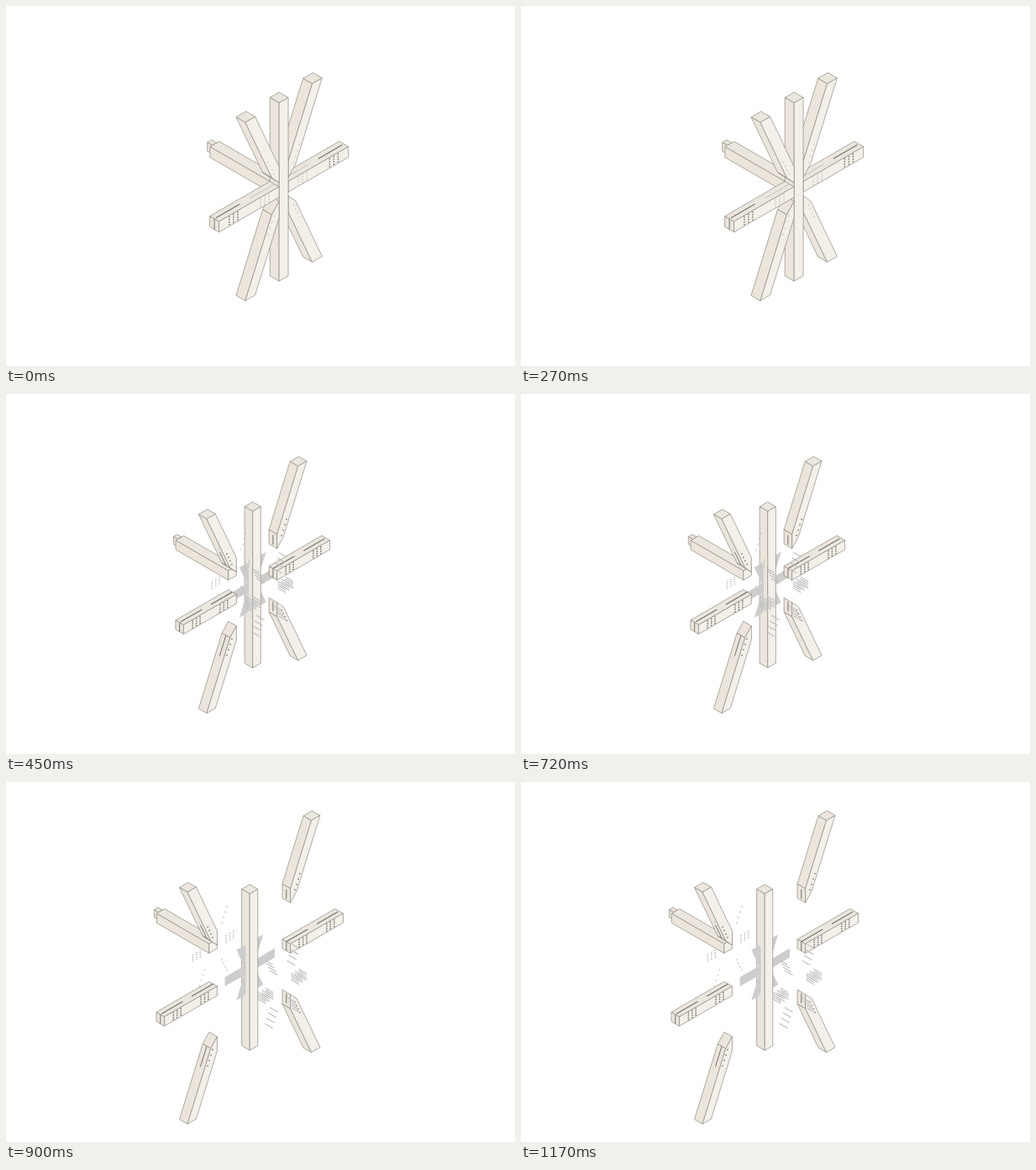
Write an HTML page with a canvas that moves like this. It is 606 px wide and 428 px high and loops after 1.35 s.

```html
<!DOCTYPE html>
<html lang="en">
<head>
<meta charset="utf-8">
<title>Timber joint</title>
<style>
  html, body { margin: 0; width: 100%; height: 100%; overflow: hidden; background: #fff; }
  canvas { display: block; }
</style>
</head>
<body>
<canvas id="stage" width="606" height="428"></canvas>
<script>
const ctx = document.getElementById('stage').getContext('2d');
const DARK = '#ebe5dc', LIGHT = '#f3efe9', TOP = '#ece7de';
const EDGE = '#8f8a83', INK = '#77736f', PALE = '#cbc7c2', STEEL = '#cdcdcd', PIN = '#c0c0c0';

// Model units: u along the rail, v towards the viewer, z up
const HALF = 6.3, THICK = 2 * HALF, RAIL = 89, RISE = 106;
const LEAN = 46 / RISE, ARM_HALF = 6.8, MID = -HALF;
const STEP = 25.5; // how far each part moves out per pose

const poses = [
  { x: 330.6, y: 218, scale: 1, gap: 0 },
  { x: 298.5, y: 229.7, scale: 0.878, gap: STEP },
  { x: 295, y: 223.2, scale: 0.878, gap: 2 * STEP },
];
let pose, shift;

function project([u, v, z]) {
  u += shift[0]; v += shift[1]; z += shift[2];
  return [
    pose.x + pose.scale * 0.866 * (u + v),
    pose.y + pose.scale * ((v - u) / 2 - z),
  ];
}
function moved(u, v, z, draw) {
  shift = [u * pose.gap, v * pose.gap, z * pose.gap];
  draw();
  shift = [0, 0, 0];
}
function trace(points) {
  ctx.beginPath();
  for (const point of points) ctx.lineTo(...project(point));
}
function fill(color, points) {
  trace(points);
  ctx.closePath();
  ctx.fillStyle = color;
  ctx.fill();
}
function line(color, width, ...points) {
  trace(points);
  ctx.strokeStyle = color;
  ctx.lineWidth = width;
  ctx.stroke();
}
function face(color, points) {
  fill(color, points);
  line(EDGE, 0.7, ...points, points[0]);
}
function dot(color, point) {
  const [x, y] = project(point);
  ctx.fillStyle = color;
  ctx.fillRect(x - 0.75, y - 0.75, 1.5, 1.5);
}

// Extrudes a counterclockwise u, z profile from back to front
function prism(profile, back = -THICK, front = 0) {
  profile.forEach(([u, z], i) => {
    const [nextU, nextZ] = profile[(i + 1) % profile.length];
    const du = nextU - u, dz = nextZ - z;
    if (du + dz >= 0) return; // faces away
    face(-du > Math.abs(dz) ? TOP : DARK,
      [[u, front, z], [nextU, front, nextZ], [nextU, back, nextZ], [u, back, z]]);
  });
  face(LIGHT, profile.map(([u, z]) => [u, front, z]));
}
const box = (u0, u1, z0, z1) => [[u0, z0], [u1, z0], [u1, z1], [u0, z1]];

function mirrored(profile, side, up) {
  const result = profile.map(([u, z]) => [u * side, z * up]);
  return side * up < 0 ? result.reverse() : result;
}

// Positions of the pins, shared by holes, plugs and pins
function railHoles(u) {
  const holes = [];
  for (let col = -1; col <= 1; col++)
    for (let row = -1.5; row <= 1.5; row++) holes.push([u + col * 5.8, row * 3]);
  return holes;
}
function armHoles(side, up) {
  return [0, 1, 2, 3].map(i => [side * (13.5 + i * 6 * LEAN), up * (25 + i * 6)]);
}
const jointHoles = [-1, 1].flatMap(side => [
  ...railHoles(side * 26), ...armHoles(side, 1), ...armHoles(side, -1),
]);

function rail(side) {
  const inner = pose.gap ? INK : PALE;
  const slot = (color, from, to) => line(color, 1.2, [side * from, MID, HALF], [side * to, MID, HALF]);
  const leftEnd = side < 0 ? -RAIL : HALF;
  moved(side, 0, 0, () => {
    prism(mirrored(box(HALF, RAIL, -HALF, HALF), side, 1));
    slot(inner, HALF, 40);
    slot(INK, 54, RAIL - 2);
    line(INK, 1, [leftEnd, MID, -HALF], [leftEnd, MID, HALF]);
    for (const [u, z] of railHoles(side * 26)) dot(inner, [u, 0, z]);
    for (const [u, z] of railHoles(side * 69)) dot(INK, [u, 0, z]);
  });
}

// Leaning arm, mitred against the post and the rail
function arm(side, up) {
  const outer = z => z * LEAN + ARM_HALF;
  const profile = [
    [HALF, 11], [outer(22), 22], [outer(RISE), RISE],
    [outer(RISE) - 2 * ARM_HALF, RISE], [HALF, (HALF + ARM_HALF) / LEAN],
  ];
  moved(side, 0, up, () => {
    prism(mirrored(profile, side, up));
    for (const [u, z] of armHoles(side, up)) dot(pose.gap ? INK : PALE, [u, 0, z]);
    if (!pose.gap) return;
    if (side > 0) line(INK, 1, [HALF, MID, up * 13], [HALF, MID, up * 26]);
    else line(INK, 1, [-outer(22), MID, up * 22], [-outer(45), MID, up * 45]);
  });
}

function plates(side) {
  if (!pose.gap) return;
  const plate = profile => fill(STEEL, profile.map(([u, z]) => [side * u, MID, z]));
  plate(box(HALF, 39, -HALF, HALF));
  for (const up of [-1, 1])
    plate([[HALF, 0], [HALF, up * 30], [8.5, up * 34], [21, up * 34]]);
}

function wing(side) {
  plates(side);
  arm(side, -1);
  rail(side);
  arm(side, 1);
}

function rearBeam() {
  moved(0, -1, 0, () => {
    prism(box(-3, 3, -4, HALF), -102, -95);
    prism(box(-HALF, HALF, -HALF, HALF), -95, -THICK);
  });
}

function drawJoint() {
  const { gap } = pose;
  rearBeam();
  wing(1);
  prism(box(-HALF, HALF, -RISE, RISE));
  wing(-1);
  if (!gap) return;
  for (const [u, z] of jointHoles) {
    dot(PIN, [u, -THICK - gap, z]);
    line(PIN, 1.2, [u, gap - THICK, z], [u, gap, z]);
  }
}

let start;
function render(now) {
  start ??= now;
  pose = poses[Math.floor((now - start) / 450) % poses.length];
  shift = [0, 0, 0];
  ctx.fillStyle = '#fff';
  ctx.fillRect(0, 0, 606, 428);
  drawJoint();
  requestAnimationFrame(render);
}
requestAnimationFrame(render);
</script>
</body>
</html>
```
